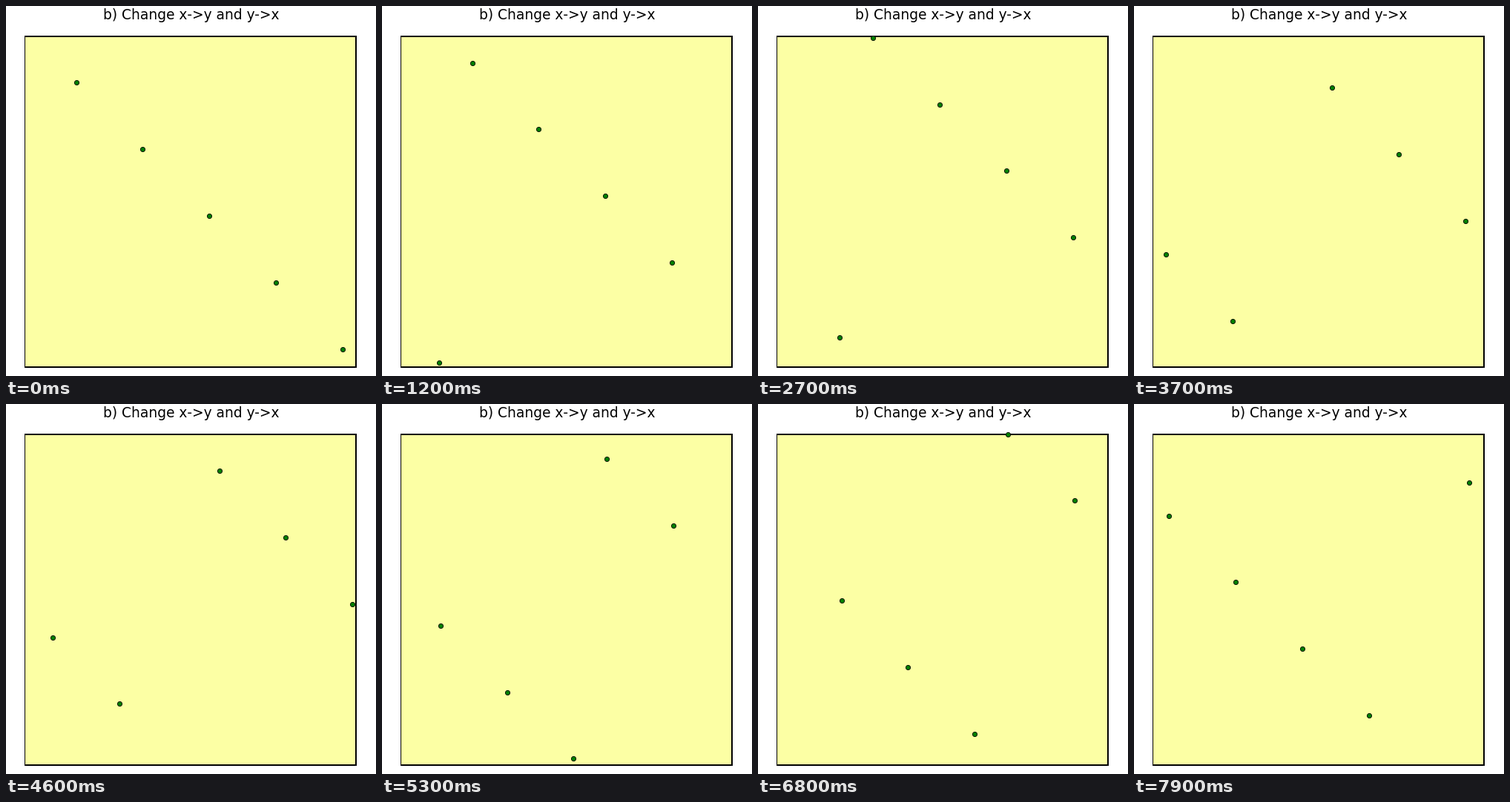
These frames come from a looping animation (499 by 499 pixels, 8000 ms). A matplotlib script:

```python
import matplotlib.pyplot as plt
from matplotlib.animation import FuncAnimation
from matplotlib.patches import Rectangle

SIZE, DPI = 499, 100
FRAMES, INTERVAL = 80, 100
N = 200                       # cells per side
CELL = 0.9 * SIZE / N         # pixels per cell
LEFT, BOTTOM = 0.05 * SIZE, 487.45


def to_px(x, y):
    return LEFT + CELL * x, BOTTOM - CELL * y


def step(x, y):
    """Move one cell up and right; on leaving the field, wrap and swap axes."""
    x, y = x + 1, y + 1
    if x >= N or y >= N:
        x, y = y % N, x % N
    return x, y


def positions(frame):
    dots = [(31 + 40 * k, 171 - 40 * k) for k in range(5)]
    for _ in range(frame):
        dots = [step(*d) for d in dots]
    return [to_px(*d) for d in dots]


fig = plt.figure(figsize=(SIZE / DPI, SIZE / DPI), dpi=DPI, facecolor="white")
ax = fig.add_axes([0, 0, 1, 1])
ax.set_xlim(0, SIZE)
ax.set_ylim(SIZE, 0)
ax.axis("off")

clip = Rectangle((25, 38), 449, 450, transform=ax.transData)

field = Rectangle((25, 41), 447, 446, facecolor="#fcffa4", edgecolor="black",
                  linewidth=2 * 72 / DPI, joinstyle="miter")
ax.add_patch(field)
field.set_clip_path(clip)

dots = ax.scatter(*zip(*positions(0)), s=20, c="green", edgecolors="black",
                  linewidths=0.6, zorder=3)
dots.set_clip_path(clip)

ax.text(SIZE / 2, 18, "b) Change x->y and y->x", ha="center", va="baseline",
        family="DejaVu Sans", fontsize=18.67 * 72 / DPI)


def update(frame):
    dots.set_offsets(positions(frame))
    return (dots,)


anim = FuncAnimation(fig, update, frames=FRAMES, interval=INTERVAL,
                     repeat=True, repeat_delay=0)
plt.show()
```
